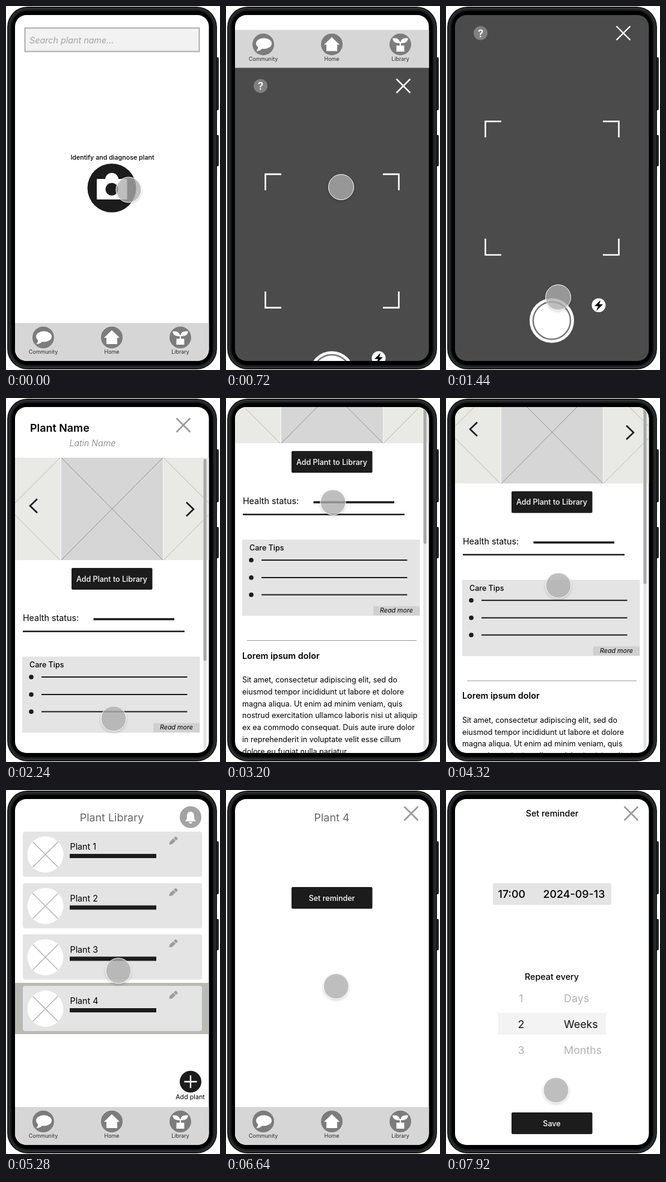
Recreate the animation shown at these times as an HTML page. Size 356 by 604 pixels, loop 8000 ms.

```html
<!DOCTYPE html>
<html lang="en">
<head>
<meta charset="utf-8">
<title>Plant app walkthrough</title>
<style>
  html, body { margin: 0; width: 100%; height: 100%; overflow: hidden; background: #fff; }
  svg { display: block; width: 100vw; height: 100vh; }
  text { font-family: Inter, Roboto, sans-serif; }
  #cursor { filter: drop-shadow(0 2px 2px rgba(0, 0, 0, .2)); }
</style>
</head>
<body>
<svg id="stage" viewBox="0 0 356 604"></svg>
<script>
const LOOP = 8000, STEP = 80, INK = '#1c1c1c', CARD = '#e4e4e4', UNIT = 322 / 360;

// Drawing helpers; text sizes are in design units
const text = (x, y, str, size, more = '') =>
  `<text x="${x}" y="${y}" font-size="${(size * UNIT).toFixed(2)}" ${more}>${str}</text>`;
const mid = (x, y, str, size, more = '') => text(x, y, str, size, 'text-anchor="middle" ' + more);
const rect = (x, y, w, h, fill, r = 0, more = '') =>
  `<rect x="${x}" y="${y}" width="${w}" height="${h}" rx="${r}" fill="${fill}" ${more}/>`;
const disc = (x, y, r, fill) => `<circle cx="${x}" cy="${y}" r="${r}" fill="${fill}"/>`;
const line = (d, color, w) => `<path d="${d}" fill="none" stroke="${color}" stroke-width="${w}"/>`;
const shape = (d, fill) => `<path d="${d}" fill="${fill}"/>`;
const cross = (x, y, r, color, w) =>
  line(`M${x - r} ${y - r}l${2 * r} ${2 * r}m0 ${-2 * r}l${-2 * r} ${2 * r}`, color, w);
const screen = (id, body, bg = '#fff') => `<g id="${id}">${rect(15, 15, 323, 574, bg)}${body}</g>`;
const button = (y, label) => rect(109, y, 134.5, 36, INK, 2) +
  mid(176, y + 22.5, label, 14, 'fill="#fff" font-weight="500"');
const BOLD = 'font-weight="600"', MEDIUM = 'font-weight="500"', ITALIC = 'font-style="italic"';

const nav = rect(15, 526, 323, 63, '#d6d6d6') +
  [[62, 'Community'], [176, 'Home'], [290, 'Library']].map(([x, label]) =>
    disc(x, 550, 18, '#7c7c7c') + mid(x, 577, label, 10, 'fill="#2c2c2c"')).join('') +
  '<ellipse cx="63" cy="548.5" rx="13" ry="9" fill="#fff"/>' +
  shape('M53 553q1 5-3 8q7 0 10-4z', '#fff') +
  shape('M176 538l13 12.5h-4v10.5h-18v-10.5h-4z', '#fff') +
  rect(283.5, 552, 13, 10, '#fff') + line('M290 553v-7', '#fff', 2) +
  shape('M290 548q-12 1-13-8q11-2 13 8q1-10 13-8q-1 9-13 8z', '#fff');

const home = screen('home',
  rect(31.5, 36.5, 290, 39, '#f2f2f2', 0, 'stroke="#a6a6a6" stroke-width="1.8"') +
  text(39, 62, 'Search plant name...', 16, ITALIC + ' fill="#a3a3a3"') +
  mid(177, 255, 'Identify and diagnose plant', 12, MEDIUM) +
  disc(176, 302, 40.5, INK) + rect(151, 287, 50.5, 34, '#fff', 1) + disc(176, 288, 11, '#fff') +
  disc(176, 304, 10.5, INK) + nav);

const camera = screen('camera',
  disc(57.5, 45, 11.5, '#808080') + mid(57.5, 51.5, '?', 19, BOLD + ' fill="#fff"') +
  cross(295, 45, 11.5, '#fff', 2.4) +
  line('M65.5 218v-26.5h26.500M261 191.5h26.5v26.5M65.5 386v27h26.5M261 413h26.5v-27', '#fff', 2.6) +
  disc(176, 522, 37, '#fff') +
  '<circle cx="176" cy="522" r="31" fill="none" stroke="#777" stroke-width="2.5"/>' +
  disc(254, 496.5, 11.5, '#fff') + shape('M257 488l-10 10h6l-3 8l11-11h-6z', '#000'), '#4b4b4b');

// Plant page, taller than the screen
const paragraph = (y, str) => str.split('|').map((s, i) => text(27, y + i * 19.8, s, 14)).join('');
const readMore = (x, y) => rect(x, y, 77, 15, '#d0d0d0') + text(x + 11, y + 10.5, 'Read more', 12, ITALIC);
const plant = screen('plant', '<g id="page">' +
  text(40, 56, 'Plant Name', 20, BOLD) +
  text(105.5, 80, 'Latin Name', 16, ITALIC + ' font-weight="300" fill="#777"') +
  cross(295, 45, 11.5, '#9a9a9a', 2.6) +
  rect(15, 99, 323, 170, '#e9e9e5') + rect(90.5, 99, 171.5, 170, '#f4f4f4') + rect(92, 99, 169, 170, '#d6d6d6') +
  line('M92 99l169 170m0-170l-169 170', '#808080', .8) +
  line('M90 99l-170 170m0-170l170 170M262 99l170 170m0-170l-170 170', '#b0b0ac', .8) +
  line('M52 167.5l-12 11.5l12 11.5M300 173l12 11.5l-12 11.5', INK, 2.6) +
  button(282, 'Add Plant to Library') +
  text(28, 370, 'Health status:', 16) +
  line('M145.5 367h134.5', INK, 3.6) + line('M28 387.3h269', INK, 2.4) +
  rect(27, 429, 295.5, 126.5, CARD) + text(39, 447, 'Care Tips', 14, MEDIUM) +
  [463, 492, 520.5].map(y => disc(42, y, 3.8, INK) + line(`M59 ${y}h242.5`, INK, 2)).join('') +
  readMore(245, 539.5) +
  line('M35 596.5h282', '#999', 1.2) +
  text(27, 626.5, 'Lorem ipsum dolor', 16, BOLD) +
  paragraph(666, 'Sit amet, consectetur adipiscing elit, sed do|eiusmod tempor incididunt ut labore et dolore|' +
    'magna aliqua. Ut enim ad minim veniam, quis|nostrud exercitation ullamco laboris nisi ut aliquip|' +
    'ex ea commodo consequat. Duis aute irure dolor|in reprehenderit in voluptate velit esse cillum|' +
    'dolore eu fugiat nulla pariatur.') +
  text(27, 843, 'Excepteur sint', 16, BOLD) +
  paragraph(883, 'Occaecat cupidatat non proident, sunt in culpa|qui officia deserunt mollit anim id est laborum.|' +
    'Lorem ipsum dolor sit amet, consectetur|adipiscing elit, sed do eiusmod tempor incididunt|' +
    'ut labore et dolore magna aliqua. Ut enim ad|minim veniam, quis nostrud exercitation ullamco|' +
    'laboris nisi ut aliquip ex ea commodo conseq...') +
  readMore(248, 1017) +
  rect(328.5, 101, 5, 1010, '#e3e3e3', 2.5) + rect(328.5, 101, 5, 335, '#a9a9a9', 2.5) + '</g>');

const card = (y, n) => rect(28, y, 298, 75, CARD, 4) + disc(65.5, y + 38, 30, '#fff') +
  cross(65.5, y + 38, 21, '#b0b0b0', 1.4) +
  text(106.5, y + 30, 'Plant ' + n, 16) + rect(106, y + 37, 144, 7, INK) +
  `<g transform="translate(278 ${y + 15.5}) rotate(-42)">` +
  shape('M-9 0l4-2.8h8v5.6h-8zM4-2.8h3.5q1 0 1 1v3.6q0 1-1 1h-3.5z', '#9c9c9c') + '</g>';
const library = screen('library',
  mid(176, 51.5, 'Plant Library', 20, 'fill="#666"') +
  disc(307, 45, 18, '#a3a3a3') +
  shape('M298 52q3-2 3-8q0-8 6-8t6 8q0 6 3 8zM304 53h6q-1 3-3 3t-3-3z', '#fff') +
  rect(15, 320, 323, 85, '#b8bab6') +
  [69, 154.5, 239.5, 325].map((y, i) => card(y, i + 1)).join('') +
  disc(307, 484, 18, INK) + line('M296.5 484h21m-10.5-10.5v21', '#fff', 2.4) +
  mid(306.5, 512.5, 'Add plant', 12) + nav);

const detail = screen('detail',
  mid(176, 51.5, 'Plant 4', 20, 'fill="#666"') + cross(308, 39, 11.5, '#9a9a9a', 2.6) +
  button(161, 'Set reminder') + nav);

const option = (y, n, unit, fill) => mid(125, y, n, 20, `fill="${fill}"`) + text(196, y, unit, 20, `fill="${fill}"`);
const reminder = screen('reminder',
  mid(176.5, 44, 'Set reminder', 16, MEDIUM) + cross(308, 39, 11.5, '#9a9a9a', 2.6) +
  rect(78, 154.5, 197, 36, CARD, 2) +
  text(86.5, 179, '17:00', 20, MEDIUM) + text(161.5, 179, '2024-09-13', 20, MEDIUM) +
  mid(176, 315, 'Repeat every', 16, MEDIUM) +
  rect(87, 370, 179, 36, '#f3f3f3') +
  option(352, 1, 'Days', '#b3b3b3') + option(395, 2, 'Weeks', '#111') + option(438, 3, 'Months', '#b3b3b3') +
  button(535, 'Save'));

document.getElementById('stage').innerHTML =
  '<defs><clipPath id="glass"><rect x="15" y="15" width="322.5" height="574" rx="19"/></clipPath></defs>' +
  rect(346, 85, 8, 88, '#222', 2) + rect(346, 214, 8, 52, '#222', 2) +
  rect(2, 1, 349, 602, '#161717', 34) +
  rect(5, 4, 343, 596, '#1d1e1f', 31, 'stroke="#38393b" stroke-width="1.4"') +
  rect(9, 8, 335, 588, '#000', 27) +
  '<g clip-path="url(#glass)">' + home + camera + plant + library + detail + reminder + '</g>' +
  '<circle id="cursor" r="21" fill="#b4b4b4" fill-opacity=".75" stroke="#fff" stroke-width="1"/>';

// Timeline: [time, x, y]
const path = [
  [0, 204, 305], [240, 191.5, 300.5], [1160, 191.5, 300.5], [1310, 199, 390], [1520, 179, 541],
  [2030, 179, 541], [2080, 179, 532], [2900, 179, 532], [2960, 164, 388], [3040, 164, 388],
  [3200, 178, 173], [3280, 186, 137], [3920, 186, 137], [4240, 187, 311], [4760, 187, 311],
  [4960, 187, 300], [5780, 187, 300], [5920, 187, 354], [6580, 187, 354], [6800, 173, 250],
  [6960, 177, 178], [7690, 177, 178], [7920, 183, 498], [LOOP, 183, 498]
];
const shows = { home: [0, 880], camera: [400, 2240], plant: [2240, 5280], library: [5280, 6240], detail: [6240, 7280], reminder: [7280, LOOP] };
const el = id => document.getElementById(id);
const span = (t, from, to) => Math.min(1, Math.max(0, (t - from) / (to - from)));

function cursorAt(t) {
  const i = path.findIndex(k => k[0] > t), a = path[i - 1], b = path[i], p = span(t, a[0], b[0]);
  return [1, 2].map(k => a[k] + (b[k] - a[k]) * p);
}

// cubic-bezier(0, 0, .58, 1)
function easeOut(p) {
  let lo = 0, hi = 1, s;
  for (let i = 0; i < 20; i++) {
    s = (lo + hi) / 2;
    if (1.74 * (1 - s) * s * s + s ** 3 < p) lo = s; else hi = s;
  }
  return 3 * s * s - 2 * s ** 3;
}

function scrollAt(t) {
  if (t < 3200) return 194 * span(t, 3040, 3200);
  if (t < 3920) return 509 - 315 * (1 - span(t, 3200, 3680)) ** 2;
  return 509 * (1 - span(t, 3920, 4720)) ** 2;
}

function draw(now) {
  const t = Math.floor((now + 10) / STEP) * STEP % LOOP;
  for (const id in shows) {
    const [from, to] = shows[id];
    el(id).style.display = t >= from && t < to ? '' : 'none';
  }
  const push = 574 * easeOut(span(t, 400, 877));
  el('home').setAttribute('transform', `translate(0 ${-push})`);
  el('camera').setAttribute('transform', `translate(0 ${574 - push})`);
  el('page').setAttribute('transform', `translate(0 ${-scrollAt(t)})`);
  el('cursor').setAttribute('transform', `translate(${cursorAt(t)})`);
}

const start = performance.now();
function tick() {
  draw(performance.now() - start);
  requestAnimationFrame(tick);
}
tick();
</script>
</body>
</html>
```
